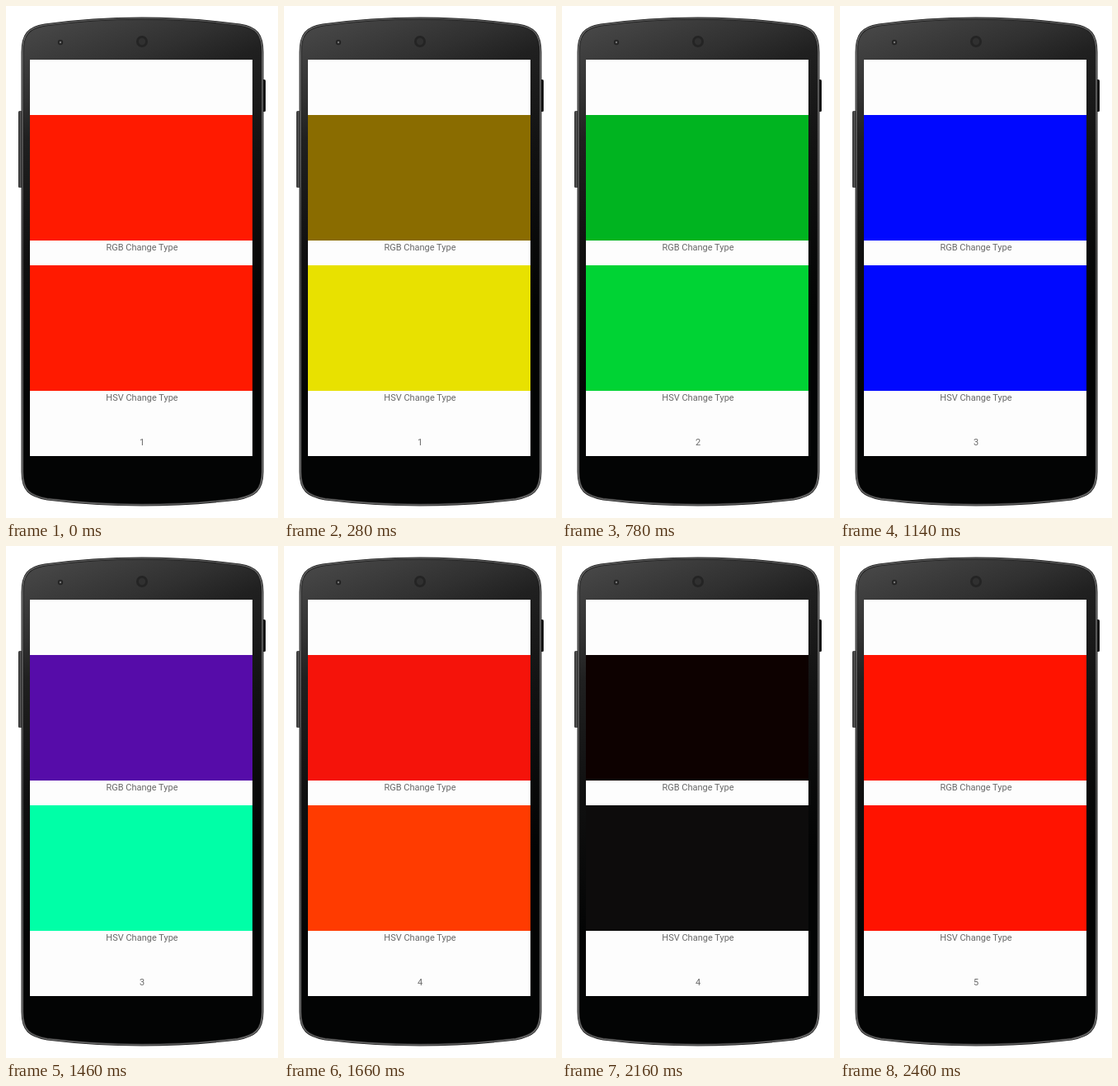
An HTML page that plays this animation: 330x620 px, repeating every 2540 ms.

```html
<!DOCTYPE html>
<html lang="en">
<head>
<meta charset="utf-8">
<title>Colour change types</title>
<style>
  html, body { margin: 0; width: 100%; height: 100%; overflow: hidden; background: #fff; }
  svg { display: block; width: 330px; height: 620px; }
  text { font: 11px Roboto, Arial, sans-serif; fill: #686868; text-anchor: middle; }
</style>
</head>
<body>
<svg viewBox="0 0 330 620">
  <defs>
    <linearGradient id="shell" gradientUnits="userSpaceOnUse" x1="60" y1="0" x2="215" y2="400">
      <stop offset="0" stop-color="#4b4b4b"/>
      <stop offset=".22" stop-color="#303030"/>
      <stop offset=".32" stop-color="#202020"/>
      <stop offset=".6" stop-color="#111"/>
      <stop offset="1" stop-color="#030404"/>
    </linearGradient>
    <linearGradient id="rim" x1="0" y1="0" x2="0" y2="1">
      <stop offset="0" stop-color="#555"/>
      <stop offset=".08" stop-color="#777"/>
      <stop offset=".5" stop-color="#4a4a4a"/>
      <stop offset=".94" stop-color="#777"/>
      <stop offset="1" stop-color="#666"/>
    </linearGradient>
    <linearGradient id="key" x1="0" y1="0" x2="1" y2="0">
      <stop offset="0" stop-color="#222"/>
      <stop offset=".5" stop-color="#5a5a5a"/>
      <stop offset="1" stop-color="#111"/>
    </linearGradient>
    <path id="body" d="M20 56C20 35 27 26 47 23Q105 15 165 15T284 23C304 26 311 35 311 56V564C311 587 301 593 281 597Q222 604 165 604T50 597C29 593 20 587 20 564Z"/>
  </defs>
  <rect x="15" y="127" width="5" height="93" rx="1.5" fill="url(#key)"/>
  <rect x="310.5" y="89" width="4.5" height="39" rx="1.5" fill="#151515"/>
  <use href="#body" fill="url(#shell)" stroke="#1c1c1c" stroke-width="3"/>
  <use href="#body" fill="none" stroke="url(#rim)" stroke-width="1.4"/>
  <circle cx="165" cy="43" r="7" fill="#242424"/>
  <circle cx="165" cy="43" r="4.2" fill="#303030"/>
  <circle cx="66" cy="44" r="3.2" fill="#252525"/>
  <circle cx="66" cy="44" r="1.2" fill="#777"/>
  <rect x="29" y="65" width="270" height="480" fill="#fdfdfd"/>
  <rect id="rgb" x="29" y="132" width="270" height="152"/>
  <rect id="hsv" x="29" y="314" width="270" height="152"/>
  <text x="165" y="296">RGB Change Type</text>
  <text x="165" y="478">HSV Change Type</text>
  <text id="page" x="165" y="531.5"></text>
</svg>
<script>
const LOOP = 2540, TICK = 20;

// h, s, v of the successive colours
const COLORS = [
  [6, 1, 1], [120, 1, 0.804], [238, 1, 1], [4.5, 1, 1], [0, 0, 0], [4.5, 1, 1]
];

// time, position along COLORS
const STEPS = [
  [0, 0], [40, 0], [60, .02], [160, .15], [260, .4], [340, .63], [420, 0.79],
  [500, .94], [580, 1], [760, 1], [780, 1.125], [860, 1.4], [940, 1.7],
  [1040, 1.93], [1140, 2], [1340, 2], [1360, 2.03], [1440, 2.25], [1520, 2.6],
  [1600, 2.87], [1660, 2.96], [1820, 3], [2020, 3], [2040, 3.08], [2100, 3.6],
  [2160, 3.95], [2220, 4], [2260, 4.05], [2340, 4.5], [2400, 4.87], [2460, 5], [LOOP, 5]
];

// time at which each page number appears
const PAGES = [0, 320, 920, 1500, 2220];

const $ = id => document.getElementById(id);
const lerp = (a, b, p) => a + (b - a) * p;
const mix = (a, b, p) => a.map((v, i) => lerp(v, b[i], p));
const css = c => `rgb(${c.map(Math.round)})`;

function toRgb([h, s, v]) {
  const channel = n => {
    const k = (n + h / 60) % 6;
    return 255 * v * (1 - s * Math.max(0, Math.min(k, 4 - k, 1)));
  };
  return [channel(5), channel(3), channel(1)];
}

function positionAt(t) {
  const i = STEPS.findIndex(s => s[0] > t);
  const [t0, p0] = STEPS[i - 1], [t1, p1] = STEPS[i];
  return lerp(p0, p1, (t - t0) / (t1 - t0));
}

function draw(time) {
  const t = Math.floor(time % LOOP / TICK) * TICK;
  const pos = positionAt(t);
  const i = Math.min(Math.floor(pos), COLORS.length - 2);
  const a = COLORS[i], b = COLORS[i + 1], p = pos - i;
  $("rgb").setAttribute("fill", css(mix(toRgb(a), toRgb(b), p)));
  $("hsv").setAttribute("fill", css(toRgb(mix(a, b, p))));
  $("page").textContent = PAGES.filter(start => start <= t).length;
}

const start = performance.now();
function frame() {
  draw(performance.now() - start);
  requestAnimationFrame(frame);
}
frame();
</script>
</body>
</html>
```
